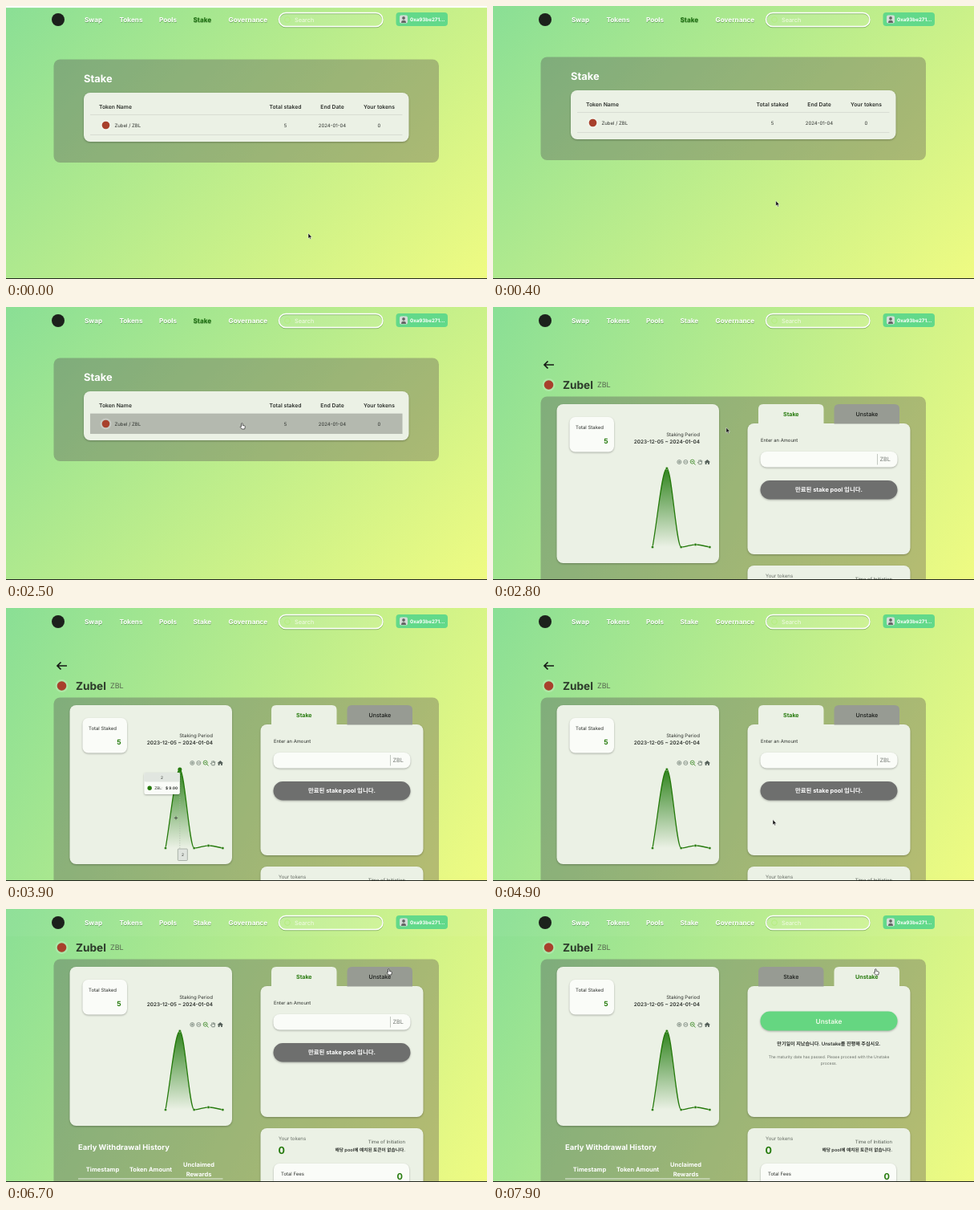
These frames come from a looping animation (600x340 px, 8 s). An HTML page:

```html
<!DOCTYPE html>
<html lang="ko">
<head>
<meta charset="utf-8">
<title>Staking page</title>
<style>
html, body { margin: 0; width: 100%; height: 100%; overflow: hidden; }
svg { display: block; width: 600px; height: 340px; }
text { font-family: Inter, "Noto Sans CJK KR", "Noto Sans CJK", sans-serif; white-space: pre; text-rendering: geometricPrecision; }
.lift { filter: drop-shadow(0 1px 1px rgba(0, 0, 0, .28)); }
</style>
</head>
<body>
<svg id="stage" viewBox="0 0 600 340"></svg>
<script>
const LOOP = 8000, GREEN = '#257a0c', INK = '#2c302c', PANEL = 'rgba(75,60,75,.32)';
const CARD = '#ebf1e5', FIELD = '#fafcf8';
const TOKEN = 'Zubel', SYMBOL = 'ZBL', WALLET = '0xa93be271...';

// y is the middle of the capitals
const text = (x, y, s, size, fill = INK, weight = 400, anchor = 'start', more = '') =>
  `<text x="${x}" y="${y + size * .36}" font-size="${size}" fill="${fill}" font-weight="${weight}" text-anchor="${anchor}" ${more}>${s}</text>`;
const box = (x, y, w, h, r, fill, more = '') =>
  `<rect x="${x}" y="${y}" width="${w}" height="${h}" rx="${r}" fill="${fill}" ${more}/>`;
const dot = (x, y, r, fill, more = '') => `<circle cx="${x}" cy="${y}" r="${r}" fill="${fill}" ${more}/>`;
const line = (d, stroke, width = 1, more = '') =>
  `<path d="${d}" fill="none" stroke="${stroke}" stroke-width="${width}" ${more}/>`;
const group = (id, body) => `<g id="${id}">${body}</g>`;

const tokenIcon = (x, y, r) => dot(x, y, r, '#a8402c');

function navBar() {
  const links = [[98, 'Swap'], [141.5, 'Tokens'], [191, 'Pools'], [233.5, 'Stake'], [277.5, 'Governance']];
  return dot(65, 17, 8, '#1c211c') +
    links.map(([x, s]) => text(x + .2, 18, s, 8.2, 'rgba(20,60,20,.35)', 700) +
      text(x, 17, s, 8.2, '#fff', 700, 'start', s == 'Stake' ? 'id="here"' : '')).join('') +
    box(340.5, 9.5, 129.5, 17, 8.5, 'none', 'stroke="rgba(20,60,20,.3)" stroke-width="1.6"') +
    box(340.5, 8.5, 129.5, 17, 8.5, 'rgba(255,255,255,.1)', 'stroke="#fff" stroke-width="1.5"') +
    dot(351, 17, 3.4, 'none', 'stroke="#b5ee80" stroke-width="1"') +
    text(360, 17, 'Search', 7.3, '#f4fbe9') +
    box(486.5, 8, 64.5, 17, 4, '#62d98a') +
    box(491, 11.5, 10, 10, 2, '#d5ddd8') + dot(496, 15, 1.9, '#666') +
    '<path d="M493 21q0-3.2 3-3.2t3 3.2z" fill="#666"/>' +
    text(504, 16.5, WALLET, 6.2, '#fff', 700);
}

function listPage() {
  const cols = [[348.5, 'Total staked', '5'], [407, 'End Date', '2024-01-04'], [465.5, 'Your tokens', '0']];
  return box(59.5, 63.5, 480.5, 128.5, 8, PANEL) +
    text(97, 87, 'Stake', 12.9, '#fff', 700) +
    box(97, 105, 405.5, 61, 8, CARD, 'class="lift"') +
    text(116, 122.5, 'Token Name', 6.8, INK, 600) +
    line('M105 132.5H494.5M105 157.5H494.5', '#d3d9ce', .8) +
    box(105, 133, 389.5, 25, 0, '#b4b9af', 'id="row"') +
    dot(124.5, 145.5, 7, 'rgba(255,255,255,.25)') + tokenIcon(124.5, 145.5, 4.8) +
    text(135.5, 145.5, `${TOKEN} / ${SYMBOL}`, 6) +
    cols.map(([x, head, value]) =>
      text(x, 122.5, head, 6.8, INK, 600, 'middle') + text(x, 145.5, value, 6, INK, 400, 'middle')).join('');
}

// Chart geometry: the curve is flat at inner points and leaves the end points at a slope
const VALUES = [0, 9, 0, .28, 0], STEP = 17.85, LAST = VALUES.length - 1;
const px = i => 199 + i * STEP, py = i => 299 - VALUES[i] * 10.9;
let curve = `M${px(0)} ${py(0)}`;
for (let i = 0; i < LAST; i++) {
  const rise = (py(i + 1) - py(i)) / 3;
  const y1 = py(i) + (i == 0 ? rise : 0), y2 = py(i + 1) - (i + 1 == LAST ? rise : 0);
  curve += `C${px(i) + STEP / 3} ${y1} ${px(i + 1) - STEP / 3} ${y2} ${px(i + 1)} ${py(i + 1)}`;
}

function chart() {
  const gray = '#68756c', stroke = (d, c = gray) => line(d, c, .8);
  const lens = (x, y, c = gray) => dot(x, y, 2.5, 'none', `stroke="${c}" stroke-width=".7"`);
  return '<linearGradient id="fade" x2="0" y2="1"><stop stop-color="#1f7a0c" stop-opacity=".92"/><stop offset="1" stop-color="#1f7a0c" stop-opacity="0"/></linearGradient>' +
    lens(232.3, 193) + stroke('M230.8 193h3M232.3 191.5v3') +
    lens(240.3, 193) + stroke('M238.8 193h3') +
    lens(248.7, 192.6, GREEN) + stroke('M250.5 194.5l2 2M247.4 192.6h2.6', GREEN) +
    stroke('M255.2 193l1.7 2.8h3.2l.7-4.6M256.8 194v-3.4M258.2 193v-3M259.6 193v-2.6') +
    '<path d="M263.5 193.2l3.8-3.3 3.8 3.3h-1.2v2.9h-1.8v-2h-1.6v2h-1.8v-2.9z" fill="#55605a"/>' +
    `<path d="${curve}Z" fill="url(#fade)"/>` + line(curve, GREEN, 1.3) +
    VALUES.map((_, i) => dot(px(i), py(i), 1.6, GREEN, 'stroke="#e9f0e4" stroke-width=".4"')).join('');
}

function tip() {
  return group('axis', line('M0 205V300', '#a9b5a6', .6, 'stroke-dasharray="1.5 1.5"') +
      box(-2.5, 300, 12, 14.5, 1, '#dfe4de', 'stroke="#939b92" stroke-width=".7"') +
      text(3.5, 307.3, '', 4.8, INK, 400, 'middle', 'class="cat"')) +
    group('mark', dot(0, 0, 2.5, GREEN)) +
    group('label', box(0, 0, 44.5, 27, 2, FIELD, 'class="lift"') + box(0, 0, 44.5, 11.5, 2, '#e1e6e0') +
      text(22, 6, '', 4.8, INK, 400, 'middle', 'class="cat"') +
      dot(6.8, 19.3, 2.7, GREEN) + text(12.8, 19.3, SYMBOL + ':', 4.8) +
      text(26.6, 19.3, '', 4.8, INK, 700, 'start', 'id="amount"'));
}

const tab = (x, s, active) =>
  `<path d="M${x} 145.5V127q0-6 6-6h69.5q6 0 6 6V145.5z" fill="${active ? CARD : '#979b93'}"/>` +
  text(x + 40.8, 133, s, 7.1, active ? GREEN : '#161916', active ? 700 : 500, 'middle');

function stakeTab() {
  return tab(425.5, 'Unstake', false) + tab(331, 'Stake', true) +
    text(334, 166, 'Enter an Amount', 5.9) +
    box(333.5, 180, 171, 19.5, 8, FIELD, 'class="lift"') + line('M479.5 183V196.5', '#b4bab2', .8) +
    text(482.5, 189, SYMBOL, 7.2, '#777c77') +
    box(333.5, 216, 171, 23.5, 11.7, '#6e6f6e', 'class="lift"') +
    text(419, 227.5, '만료된 stake pool 입니다.', 7.4, '#fff', 700, 'middle');
}

function unstakeTab() {
  return tab(331, 'Stake', false) + tab(425.5, 'Unstake', true) +
    box(333.5, 176.5, 171, 24, 11.7, '#65d681', 'class="lift"') +
    text(419, 189, 'Unstake', 8.3, '#effbe9', 600, 'middle') +
    text(419, 216.5, '만기일이 지났습니다. Unstake를 진행해 주십시오.', 6.1, INK, 600, 'middle') +
    text(419, 233, 'The maturity date has passed. Please proceed with the Unstake', 5, '#6c726b', 400, 'middle') +
    text(419, 241, 'process.', 5, '#6c726b', 400, 'middle');
}

function detailPage() {
  return line('M76 72H64M68.5 67.5L64 72L68.5 76.5', '#151a14', 1.7) +
    dot(69.5, 97, 8, 'rgba(255,255,255,.2)') + tokenIcon(69.5, 97, 5.8) +
    text(87, 97, TOKEN, 13.6, '#2c3a2a', 700) + text(130, 97, SYMBOL, 9, '#56664f') +
    box(59.5, 111.5, 480.5, 420, 8, PANEL) +
    box(79.5, 121, 202.5, 198, 8, CARD, 'class="lift"') +
    box(95.5, 137, 55.5, 43.5, 7, FIELD, 'class="lift"') +
    text(103, 150, 'Total Staked', 6) + text(143.5, 167, '5', 8.6, GREEN, 700, 'end') +
    text(258, 158.5, 'Staking Period', 6.1, INK, 400, 'end') +
    text(258, 168, '2023-12-05 ~ 2024-01-04', 6.4, INK, 600, 'end') +
    chart() + group('tip', tip()) +
    box(317.5, 145, 203, 163, 8, CARD, 'class="lift"') +
    group('stake', stakeTab()) + group('unstake', unstakeTab()) +
    box(317.5, 322, 203, 200, 8, CARD, 'class="lift"') +
    text(340, 335, 'Your tokens', 6.1, '#666d65') + text(339.5, 349, '0', 12.5, GREEN, 700) +
    text(498, 339, 'Time of Initiation', 5.9, '#555d54', 400, 'end') +
    text(498, 348.5, '해당 pool에 예치된 토큰이 없습니다.', 5.7, INK, 600, 'end') +
    box(334, 366, 169, 100, 7, FIELD, 'class="lift"') +
    text(343, 378.5, 'Total Fees', 6) + text(495, 382, '0', 11, GREEN, 700, 'end') +
    text(90, 345.5, 'Early Withdrawal History', 9.4, '#fff', 700) +
    [[120.5, 373, 'Timestamp'], [180.5, 373, 'Token Amount'], [240.5, 367, 'Unclaimed'], [240.5, 379, 'Rewards']]
      .map(([x, y, s]) => text(x, y, s, 7.5, '#fff', 700, 'middle')).join('') +
    line('M90 385H270.5', '#eef4ea', .9);
}

const pointers =
  group('arrow', '<path d="M0 0V6.6L1.5 5.3L2.5 7.6L3.6 7.1L2.6 4.9H4.6Z" fill="#111" stroke="#fff" stroke-width=".5"/>') +
  group('hand', '<path d="M-1 .2Q0-.8.7.2V2.4L3.2 3Q4 3.3 3.8 4.2L3.2 7H-.2L-2.3 4.4Q-2.4 3.4-1 4Z" fill="#fff" stroke="#222" stroke-width=".7"/>') +
  group('cross', line('M-2.2 0H2.2M0-2.2V2.2', '#333', .7));

const stage = document.getElementById('stage');
stage.innerHTML =
  '<clipPath id="below"><path d="M0 29H600V340H0z"/></clipPath>' +
  group('list', listPage()) +
  `<g clip-path="url(#below)">${group('detail', detailPage())}</g>` +
  box(0, 0, 600, 34, 0, 'rgba(255,255,255,.04)', 'id="band"') + navBar() +
  box(0, 0, 600, 2, 0, '#fff', 'id="gap"') +
  box(597, 0, 2.4, 192, 1.2, 'rgba(85,115,65,.8)', 'id="bar"') +
  box(0, 339, 600, 1, 0, '#23271f') + pointers;

const $ = id => document.getElementById(id);
const show = (id, on) => $(id).setAttribute('display', on ? 'inline' : 'none');
const move = (id, x, y) => $(id).setAttribute('transform', `translate(${x} ${y})`);

// Eased value along [time, ...values] keys
function track(keys, t) {
  const n = keys.findIndex(k => k[0] > t);
  if (n < 1) return keys[n < 0 ? keys.length - 1 : 0].slice(1);
  const a = keys[n - 1], b = keys[n], u = (t - a[0]) / (b[0] - a[0]), e = u * u * (3 - 2 * u);
  return a.slice(1).map((v, i) => v + (b[i + 1] - v) * e);
}
const POINTER = [[0, 377, 283], [150, 377, 283], [850, 294.5, 145], [2700, 294.5, 145], [3500, 212, 261.5],
  [3950, 212, 261.5], [4450, 349, 263.5], [5800, 349, 263.5], [6500, 477.5, 75]];
const SCROLL = [[5100, 0], [5500, 37], [5800, 49]];
const BOUNCE = [[0, 3], [250, 0]];
const OPEN = 2600, UNSTAKE = 7000;

function hover(x, y) {
  const i = Math.round((x - px(0)) / STEP);
  const on = i >= 0 && i <= LAST && y > 200 && y < 300;
  show('tip', on);
  if (!on) return false;
  move('axis', px(i), 0);
  move('mark', px(i), py(i));
  move('label', px(i) + (i ? -44.5 : 4), Math.min(py(i) + 4, 268));
  document.querySelectorAll('.cat').forEach(c => c.textContent = i + 1);
  $('amount').textContent = '$ ' + VALUES[i].toFixed(2);
  return true;
}

function draw(t) {
  const [x, y] = track(POINTER, t), [scroll] = track(SCROLL, t), [lift] = track(BOUNCE, t);
  const detail = t >= OPEN, unstake = t >= UNSTAKE;
  stage.style.background = `linear-gradient(${detail ? 118 : 135}deg, #8adf95, #effb82)`;
  show('list', !detail);
  show('detail', detail);
  show('stake', !unstake);
  show('unstake', unstake);
  move('list', 0, lift);
  move('detail', 0, -scroll);
  show('band', scroll > 0);
  show('gap', lift > .1);
  $('gap').setAttribute('height', lift * .7);
  show('bar', scroll > 0 && t < 6400);
  move('bar', 0, scroll * .565);
  $('here').setAttribute('fill', detail ? '#fff' : '#1d7010');

  const onRow = !detail && y > 133 + lift && y < 158 + lift;
  const onTab = detail && x > 425 && y > 121 - scroll && y < 145 - scroll;
  show('row', onRow);
  const onChart = hover(x, y + scroll) && detail;
  const shape = onRow || onTab ? 'hand' : onChart ? 'cross' : 'arrow';
  for (const id of ['arrow', 'hand', 'cross']) {
    show(id, id == shape);
    move(id, x, y);
  }
}

const start = performance.now();
function tick() {
  draw((performance.now() - start) % LOOP);
  requestAnimationFrame(tick);
}
tick();
</script>
</body>
</html>
```
